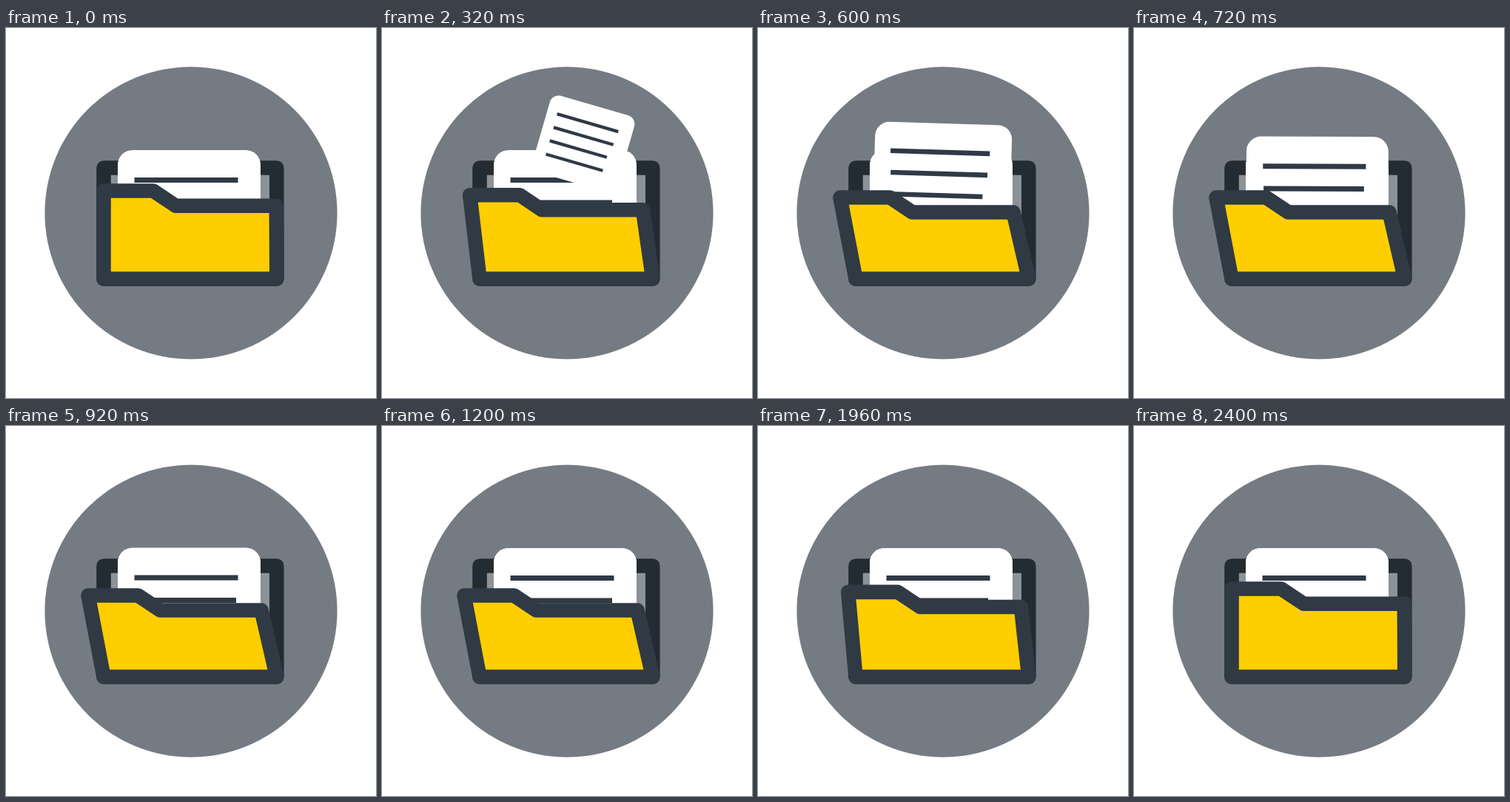
Write an HTML page that moves like this. It is 500x500 px and loops after 2600 ms.

```html
<!DOCTYPE html>
<html lang="en">
<head>
<meta charset="utf-8">
<title>Folder</title>
<style>
  html, body { margin: 0; width: 100%; height: 100%; overflow: hidden; background: #fff; }
  svg { display: block; width: 100%; height: 100%; }
  .back { fill: #8c9299; stroke: #242c33; }
  .front { fill: #ffce00; stroke: #2f3a45; }
  .back, .front { stroke-width: 19.6; stroke-linejoin: round; }
  .sheet { fill: #fff; }
  .lines { fill: none; stroke: #2f3a45; stroke-width: 7; }
</style>
</head>
<body>
<svg viewBox="0 0 500 500">
  <defs>
    <!-- sheet centred on its own origin -->
    <g id="sheet">
      <rect class="sheet" x="-96.5" y="-87.5" width="193" height="175" rx="20"/>
      <path class="lines" d="M-74-47h140M-73-16.5h136.500M-73 14h130.500M-73 44.500h130"/>
    </g>
  </defs>
  <circle cx="250" cy="250" r="197.6" fill="#757b83"/>
  <path class="back" d="M132 189H365.800V339H132Z"/>
  <use href="#sheet" x="247.500" y="252.500"/>
  <use href="#sheet" id="flying"/>
  <path class="front" id="front"/>
</svg>
<script>
  const LOOP = 2600, STEP = 40;
  const flying = document.getElementById('flying');
  const front = document.getElementById('front');
  const closed = [[132, 220], [199, 220], [229.5, 240.3], [365.3, 240.3]];
  const open = [[111, 229], [178.5, 229], [208.5, 249], [345, 249]];

  const span = (t, from, to) => Math.min(1, Math.max(0, (t - from) / (to - from)));
  const soften = (u, k) => u + k * u * (1 - u);

  function drawFront(t) {
    const p = t < 1600 ? soften(span(t, 0, 600), 0.4) : 1 - soften(span(t, 1600, 2400), 0.25);
    const top = closed.map((c, i) => c.map((v, j) => v + (open[i][j] - v) * p));
    front.setAttribute('d', 'M' + top.join('L') + 'L365.8 339L132 339Z');
  }

  function drawSheet(t) {
    const away = (1 - span(t, 120, 853)) ** 3;
    const rise = 63.5 * (1 + Math.cos(Math.PI * span(t, 5, 960)));
    const x = 247.5 + 90 * away ** 1.35;
    flying.setAttribute('visibility', away < 1 ? 'visible' : 'hidden');
    flying.setAttribute('transform',
      `translate(${x} ${252.5 - rise}) rotate(${42 * away}) scale(${1 - away})`);
  }

  function draw(now) {
    const t = Math.floor((now % LOOP) / STEP) * STEP;
    drawFront(t);
    drawSheet(t);
  }

  function tick() {
    draw(performance.now());
    requestAnimationFrame(tick);
  }
  tick();
</script>
</body>
</html>
```
